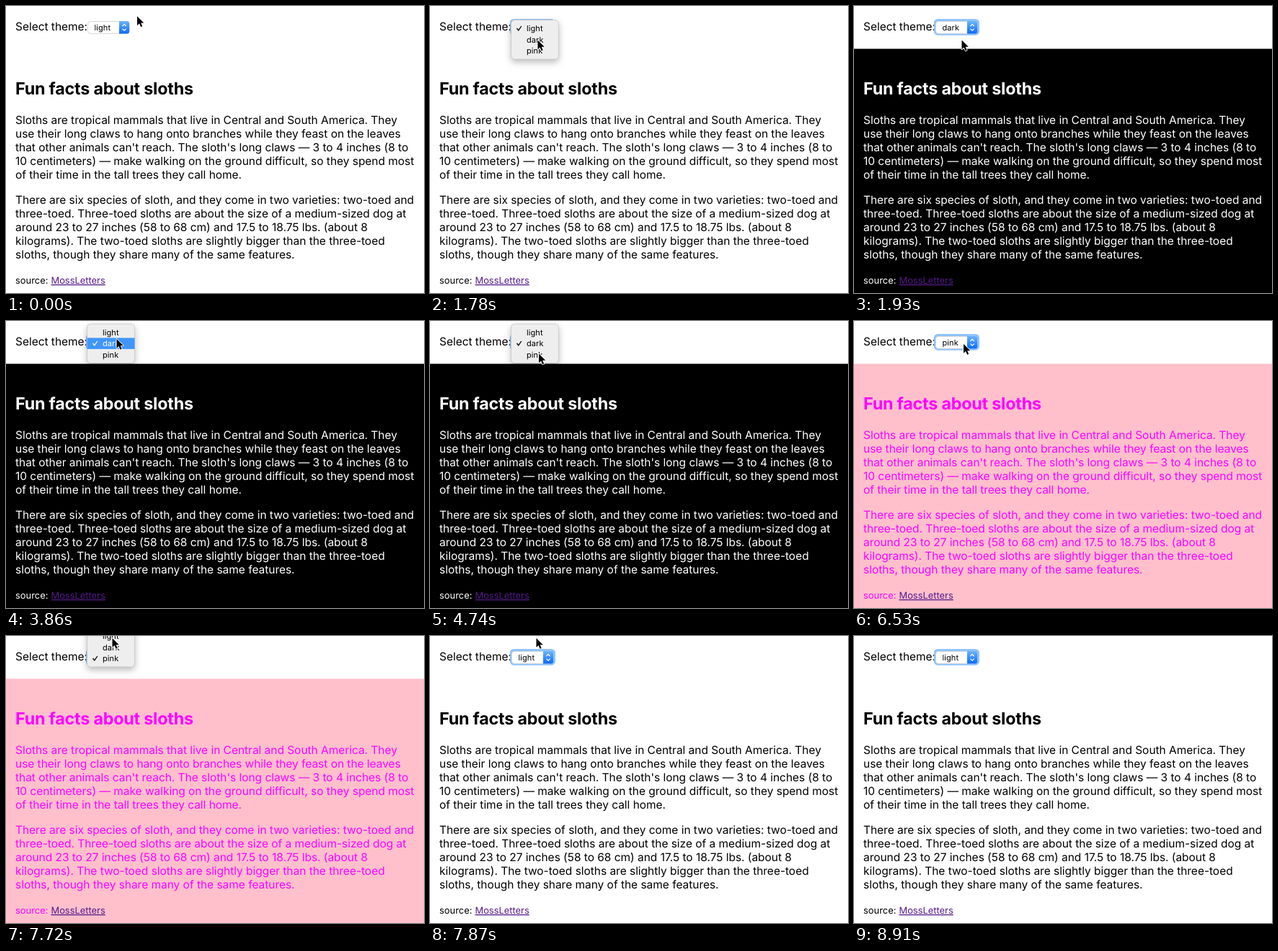
An HTML page that plays this animation: 580x399 px, repeating every 9510 ms.

```html
<!DOCTYPE html>
<html lang="en">
<head>
<meta charset="utf-8">
<title>Theme switcher</title>
<style>
  html, body { margin: 0; width: 100%; height: 100%; overflow: hidden; background: #fff; }
  svg { display: block; }
  text {
    font: 15.5px Inter, sans-serif;
    font-optical-sizing: none;
    letter-spacing: -0.03px;
    text-rendering: geometricPrecision;
    white-space: pre;
  }
  .title { font-size: 23.3px; font-weight: 700; letter-spacing: -0.2px; }
  .note { font-size: 12.9px; letter-spacing: 0; }
  .small { font-size: 11px; letter-spacing: 0.1px; }
  .link { fill: #551a8b; text-decoration: underline; }
  #menu { filter: drop-shadow(0 4px 5px rgba(0, 0, 0, .26)); }
</style>
</head>
<body>
<svg width="580" height="399" viewBox="0 0 580 399">
  <defs>
    <linearGradient id="blue" x2="0" y2="1">
      <stop stop-color="#6cb4fb"/>
      <stop offset="1" stop-color="#0a6afa"/>
    </linearGradient>
  </defs>

  <rect id="panel" y="59.5" width="580" height="340"/>
  <g id="article">
    <text class="title" x="13" y="123">Fun facts about sloths</text>
    <text class="note" x="13" y="386">source:</text>
  </g>
  <text class="note link" x="62.5" y="386">MossLetters</text>

  <text x="13" y="34">Select theme:</text>
  <rect id="ring" x="110.8" y="18" width="63.2" height="22.7" rx="5.5" fill="#8fc3fa"/>
  <rect x="113.5" y="21.5" width="57.5" height="16.8" rx="3.5" fill="#fff" stroke="#d6d6d6"/>
  <path d="M157 21h10.7a3.5 3.5 0 0 1 3.5 3.5v10.5a3.5 3.5 0 0 1-3.5 3.5h-10.7z" fill="url(#blue)"/>
  <path d="M161.5 28l2.6-2.6 2.6 2.6M161.5 31.6l2.6 2.6 2.6-2.6" fill="none" stroke="#fff" stroke-width="1.2"/>
  <text id="value" class="small" x="122.5" y="34"></text>

  <g id="menu">
    <rect x="112.6" y=".6" width="66" height="54.4" rx="5" fill="#eee" stroke="#c4c4c4" stroke-width=".8"/>
    <rect id="highlight" x="112.5" width="66" height="15.5" fill="#4096fd"/>
    <path id="check" d="M120.5 12l2.3 2.8 4-5.8" fill="none" stroke-width="1.3"/>
  </g>

  <path id="cursor" d="M0 0V12.8L3 10 5.1 14.8 7.2 13.9 5.2 9.2H9.3Z"
        stroke="#fff" stroke-width="1.6" paint-order="stroke" stroke-linejoin="round"/>
</svg>
<script>
const LOOP = 9510, TICKS = 64, ROW = 15.5;
const $ = id => document.getElementById(id);

const themes = [
  { name: 'light', back: '#fff', ink: '#000' },
  { name: 'dark', back: '#000', ink: '#fff' },
  { name: 'pink', back: '#ffc0cb', ink: '#f0f' }
];

const paragraphs = [
  [164, `Sloths are tropical mammals that live in Central and South America. They
use their long claws to hang onto branches while they feast on the leaves
that other animals can't reach. The sloth's long claws — 3 to 4 inches (8 to
10 centimeters) — make walking on the ground difficult, so they spend most
of their time in the tall trees they call home.`],
  [275, `There are six species of sloth, and they come in two varieties: two-toed and
three-toed. Three-toed sloths are about the size of a medium-sized dog at
around 23 to 27 inches (58 to 68 cm) and 17.5 to 18.75 lbs. (about 8
kilograms). The two-toed sloths are slightly bigger than the three-toed
sloths, though they share many of the same features.`]
];

const menus = [
  { open: 6, close: 13, pick: 1 },
  { open: 26, close: 33, pick: 2 },
  { open: 45, close: 53, pick: 0 }
];

const start = [182, 14.3];
const moves = [
  { from: 4, to: 5, x: 152, y: 30 },
  { from: 9, to: 11, x: 149.5, y: 47.5 },
  { from: 16, to: 18, x: 177, y: 36 },
  { from: 19, to: 23, x: 153.5, y: 25 },
  { from: 28, to: 30, x: 151, y: 45.5 },
  { from: 38, to: 44, x: 152, y: 32 },
  { from: 47, to: 50, x: 147.5, y: 3 },
  { from: 56, to: 59, x: 419, y: 206 }
];
const CURSOR_GONE = 60;

function addText(parent, string, x, y, className = '') {
  const node = document.createElementNS('http://www.w3.org/2000/svg', 'text');
  node.setAttribute('x', x);
  node.setAttribute('y', y);
  node.setAttribute('class', className);
  node.textContent = string;
  parent.append(node);
  return node;
}

for (const [top, copy] of paragraphs)
  copy.split('\n').forEach((line, i) => addText($('article'), line, 13, top + 19 * i));

const items = themes.map((theme, i) =>
  addText($('menu'), theme.name, 134, 16 + ROW * i, 'small'));

const show = (id, visible) => $(id).setAttribute('display', visible ? 'inline' : 'none');
const place = (id, x, y) => $(id).setAttribute('transform', `translate(${x} ${y})`);

function cursorAt(tick) {
  let [x, y] = start;
  for (const move of moves) {
    if (tick < move.from) break;
    const part = Math.min(1, (tick - move.from + 1) / (move.to - move.from + 1));
    const eased = part * part * (3 - 2 * part);
    x += (move.x - x) * eased;
    y += (move.y - y) * eased;
  }
  return [x, y];
}

function draw(tick) {
  const last = menus.filter(menu => tick >= menu.close).pop();
  const current = last ? last.pick : 0;
  const theme = themes[current];
  const menu = menus.find(m => tick >= m.open && tick < m.close);
  const [x, y] = cursorAt(tick);

  $('panel').setAttribute('fill', theme.back);
  $('article').setAttribute('fill', theme.ink);
  $('value').textContent = theme.name;
  show('ring', tick >= menus[0].open);
  show('menu', menu);
  show('cursor', tick < CURSOR_GONE);
  place('cursor', x, y);
  if (!menu) return;

  const top = 19 - ROW * current;
  const blink = tick === menu.close - 1;
  const hovered = blink ? -1 : Math.floor((y - top - 4) / ROW);
  const ink = row => row === hovered ? '#fff' : '#000';
  place('menu', 0, top);
  show('highlight', hovered >= 0);
  place('highlight', 0, 4.5 + ROW * hovered);
  place('check', 0, ROW * current);
  $('check').setAttribute('stroke', ink(current));
  items.forEach((item, row) => item.setAttribute('fill', ink(row)));
}

function frame() {
  const time = performance.now() % LOOP;
  draw(Math.floor(time / LOOP * TICKS + 0.12) % TICKS);
  requestAnimationFrame(frame);
}
frame();
</script>
</body>
</html>
```
